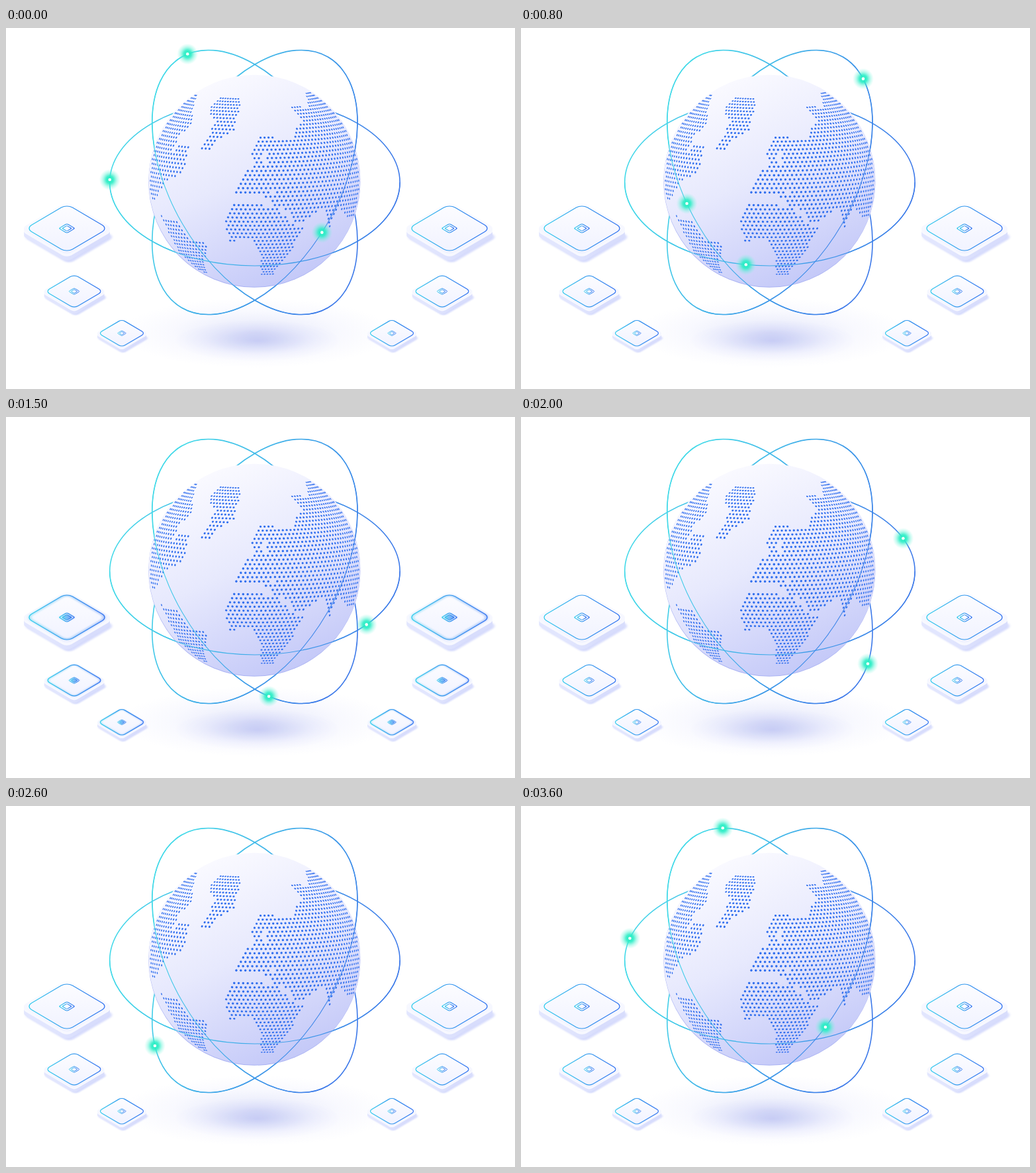
These frames come from a looping animation (769x545 px, 3700 ms). An HTML page:

```html
<!DOCTYPE html>
<html lang="en">
<head>
<meta charset="utf-8">
<title>Connected globe</title>
<style>
  html, body { margin: 0; width: 100%; height: 100%; overflow: hidden; background: #fff; }
  svg { display: block; width: 769px; height: 545px; }
  .line { fill: none; stroke: url(#edge); stroke-width: 1.2; vector-effect: non-scaling-stroke; }
  .icon { fill: none; stroke: url(#edge); stroke-width: 1.5; }
  .halo { fill: none; stroke: url(#edge); stroke-width: 4; }
  .orbit { fill: none; stroke-width: 1.6; }
  #front .orbit { stroke-width: 1.1; }
</style>
</head>
<body>
<svg viewBox="0 0 769 545">
  <defs>
    <linearGradient id="edge" x1="0" y1="1" x2="1" y2="0">
      <stop offset="0" stop-color="#2fd0ec"/><stop offset=".5" stop-color="#3298ee"/><stop offset="1" stop-color="#2c6cf0"/>
    </linearGradient>
    <linearGradient id="face" x1="0" y1="0" x2="1" y2="1">
      <stop offset="0" stop-color="#fdfdff"/><stop offset="1" stop-color="#f0f2ff"/>
    </linearGradient>
    <linearGradient id="side" x1="0" y1="1" x2="1" y2="0">
      <stop offset=".3" stop-color="#e2e6fe"/><stop offset=".7" stop-color="#d8ddfc"/>
    </linearGradient>
    <linearGradient id="wide" gradientUnits="userSpaceOnUse" x1="157" y1="0" x2="595" y2="0">
      <stop offset="0" stop-color="#41d9e8"/><stop offset="1" stop-color="#3b78e9"/>
    </linearGradient>
    <linearGradient id="tall" gradientUnits="userSpaceOnUse" x1="221" y1="180" x2="531" y2="285">
      <stop offset="0" stop-color="#41d9e8"/><stop offset="1" stop-color="#3b78e9"/>
    </linearGradient>
    <linearGradient id="ball" x1=".3" y1=".05" x2=".72" y2=".97">
      <stop offset="0" stop-color="#f9f9ff"/><stop offset=".45" stop-color="#e7e9fd"/><stop offset="1" stop-color="#c3c8f8"/>
    </linearGradient>
    <radialGradient id="ground">
      <stop offset="0" stop-color="#c8cdf5"/><stop offset=".3" stop-color="#dce0f9"/>
      <stop offset=".62" stop-color="#f2f3fe"/><stop offset="1" stop-color="#fff"/>
    </radialGradient>
    <radialGradient id="spark">
      <stop offset="0" stop-color="#1eecc0"/><stop offset=".35" stop-color="#2ceec6" stop-opacity=".9"/>
      <stop offset=".65" stop-color="#4cf0d0" stop-opacity=".4"/><stop offset="1" stop-color="#7ff5e0" stop-opacity="0"/>
    </radialGradient>
    <filter id="soft" x="-20%" y="-20%" width="140%" height="140%"><feGaussianBlur stdDeviation="2"/></filter>
    <clipPath id="band"><rect y="32.6" width="769" height="401"/></clipPath>

    <rect id="slab" x="-48.9" y="-48.9" width="97.8" height="97.8" rx="10"/>
    <g id="tile">
      <g transform="translate(3 13) scale(1 .588) rotate(45)" filter="url(#soft)" opacity=".6"><use href="#slab" fill="#bcc4fb"/></g>
      <g fill="url(#side)">
        <use href="#slab" transform="translate(0 10) scale(1 .588) rotate(45)"/>
        <use href="#slab" transform="translate(0 7) scale(1 .588) rotate(45)"/>
      </g>
      <g fill="#f7f8ff">
        <use href="#slab" transform="translate(0 4) scale(1 .588) rotate(45)"/>
        <use href="#slab" transform="translate(0 2) scale(1 .588) rotate(45)"/>
      </g>
      <use href="#slab" fill="url(#face)" transform="scale(1 .588) rotate(45)"/>
      <g transform="scale(1 .588) rotate(45)">
        <rect class="line" x="-43.8" y="-43.8" width="87.6" height="87.6" rx="12"/>
        <rect class="icon" x="-8.5" y="-8.5" width="17" height="17" rx="3"/>
        <rect class="icon" x="-5" y="-5" width="10" height="10" rx="1.5"/>
      </g>
    </g>
    <g id="glow" transform="scale(1 .588) rotate(45)">
      <rect class="halo" x="-42.8" y="-42.8" width="85.6" height="85.6" rx="11" filter="url(#soft)" opacity=".4"/>
      <rect x="-8.5" y="-8.5" width="17" height="17" rx="3" fill="url(#edge)" filter="url(#soft)" opacity=".4"/>
      <rect x="-5" y="-5" width="10" height="10" rx="1.5" fill="url(#edge)" opacity=".4"/>
    </g>
    <g id="dot"><circle r="16" fill="url(#spark)"/><circle r="2.3" fill="#fff"/></g>
  </defs>

  <ellipse cx="378" cy="460" rx="205" ry="53" fill="url(#ground)" opacity=".5"/>
  <ellipse cx="380" cy="472" rx="125" ry="31" fill="url(#ground)" opacity=".7" style="mix-blend-mode:multiply"/>
  <g id="tiles"></g>
  <g id="glows"></g>
  <g id="back" clip-path="url(#band)"></g>
  <circle cx="375.3" cy="231.8" r="160" fill="#a9b2f3"/>
  <circle cx="375.5" cy="230.8" r="160" fill="url(#ball)"/>
  <path id="land" fill="#2f6eee"/>
  <g id="front" clip-path="url(#band)"></g>
  <g id="dots"></g>
</svg>
<script>
const NS = 'http://www.w3.org/2000/svg';
const $ = id => document.getElementById(id);
const RAD = Math.PI / 180;

function add(parent, tag, attrs) {
  const el = document.createElementNS(NS, tag);
  for (const k in attrs) el.setAttribute(k, attrs[k]);
  return parent.appendChild(el);
}

// Tiles: left x, right x, y, scale
for (const [left, right, y, size] of [[92, 670, 302.5, 1], [103, 659, 397.6, .7], [175, 583, 460.8, .57]]) {
  for (const x of [left, right]) {
    const transform = `translate(${x} ${y}) scale(${size})`;
    add($('tiles'), 'use', { href: '#tile', transform });
    add($('glows'), 'use', { href: '#glow', transform });
  }
}

// Rough coastlines; the globe's rim cuts whatever reaches past it
const coasts = {
  northAmerica: 'M289 100H180V262H222L242 232 268 218 277 180 268 172 250 190 262 163 284 142 280 128Z',
  southAmerica: 'M222 262 238 288 258 292 277 321 304 325 299 356 308 378 262 340Z',
  greenland: 'M324 102 357 108 343 157 320 167 306 185 294 183 318 140 306 125Z',
  eurasia: 'M384 162 430 168 446 140 429 115 458 121 452 95H560V287H518L504 270 489 300 478 270 440 301 405 268 388 252 342 251 357 221 376 208 366 190Z',
  innerSeas: 'M386 192 396 186 394 210Z M402 248H414L410 258Z',
  africa: 'M328 290 345 262 420 272 442 299 453 297 428 340 402 374 385 373 384 340 372 319 338 322Z'
};
const land = new Path2D(Object.values(coasts).join(''));
const ctx = document.createElement('canvas').getContext('2d');
const globe = { x: 375.5, y: 230.8, r: 158 };

function onLand(x, y) {
  return Math.hypot(x - globe.x, y - globe.y) < globe.r && ctx.isPointInPath(land, x, y, 'evenodd');
}

// Staggered lat/lon grid on a slightly larger sphere, which keeps the rim airy
function drawLand() {
  const R = 168, tilt = 6 * RAD, step = 2.22, gap = 2.36;
  let d = '';
  for (let i = -36; i <= 36; i++) {
    const lat = i * step * RAD;
    for (let j = -36; j <= 36; j++) {
      const lon = (j + (i & 1) / 2) * gap * RAD;
      const east = Math.cos(lat) * Math.sin(lon), depth = Math.cos(lat) * Math.cos(lon);
      const north = Math.sin(lat) * Math.cos(tilt) - depth * Math.sin(tilt);
      const facing = depth * Math.cos(tilt) + Math.sin(lat) * Math.sin(tilt);
      const x = globe.x + R * east, y = globe.y - R * north;
      if (facing < 0 || !onLand(x, y)) continue;
      // Flatten each dot towards the rim
      const r = 1.2 + .5 * Math.cos(lat), thin = r * Math.max(.45, facing);
      const turn = Math.atan2(-north, east);
      const dx = thin * Math.cos(turn), dy = thin * Math.sin(turn);
      const arc = `a${thin} ${r} ${turn / RAD} 1 0 `;
      d += `M${x - dx} ${y - dy}${arc}${2 * dx} ${2 * dy}${arc}${-2 * dx} ${-2 * dy}`;
    }
  }
  $('land').setAttribute('d', d);
}
drawLand();

// One ellipse in three turns; its dot starts at a distance from the left tip, in px and px/ms
const orbits = [
  { angle: 0, from: -4, speed: .305 },
  { angle: 59.7, from: -10, speed: .313 },
  { angle: -59.7, from: 262, speed: .306 }
];
for (const o of orbits) {
  const ux = 219.2 * Math.cos(o.angle * RAD), uy = 219.2 * Math.sin(o.angle * RAD);
  const left = `${375.9 - ux} ${233 - uy}`, right = `${375.9 + ux} ${233 + uy}`;
  const arc = `A219.2 126 ${o.angle} 0 0 `;
  const stroke = o.angle ? 'url(#tall)' : 'url(#wide)';
  const half = `M${left}${arc}${right}`;
  o.path = add($('back'), 'path', { class: 'orbit', stroke, d: half + arc + left });
  add($('front'), 'path', { class: 'orbit', stroke, d: half });
  o.length = o.path.getTotalLength();
  o.dot = add($('dots'), 'use', { href: '#dot' });
}

const LOOP = 3700, TICK = 100;
// A dot shows between these distances and is behind the globe otherwise
const APPEAR = -152, VANISH = 703;

function pose(tick) {
  const t = tick * TICK;
  $('glows').style.visibility = tick % 2 ? 'visible' : 'hidden';
  for (const { path, length, dot, from, speed } of orbits) {
    let s = from + speed * t;
    if (s > VANISH) s -= speed * LOOP;
    dot.style.visibility = s > APPEAR ? 'visible' : 'hidden';
    const p = path.getPointAtLength((s + length) % length);
    dot.setAttribute('transform', `translate(${p.x} ${p.y})`);
  }
}

let start;
function run(now) {
  start ??= now;
  // The small lead absorbs clock jitter at tick borders
  pose(Math.floor((now - start + 10) / TICK) % (LOOP / TICK));
  requestAnimationFrame(run);
}
pose(0);
requestAnimationFrame(run);
</script>
</body>
</html>
```
